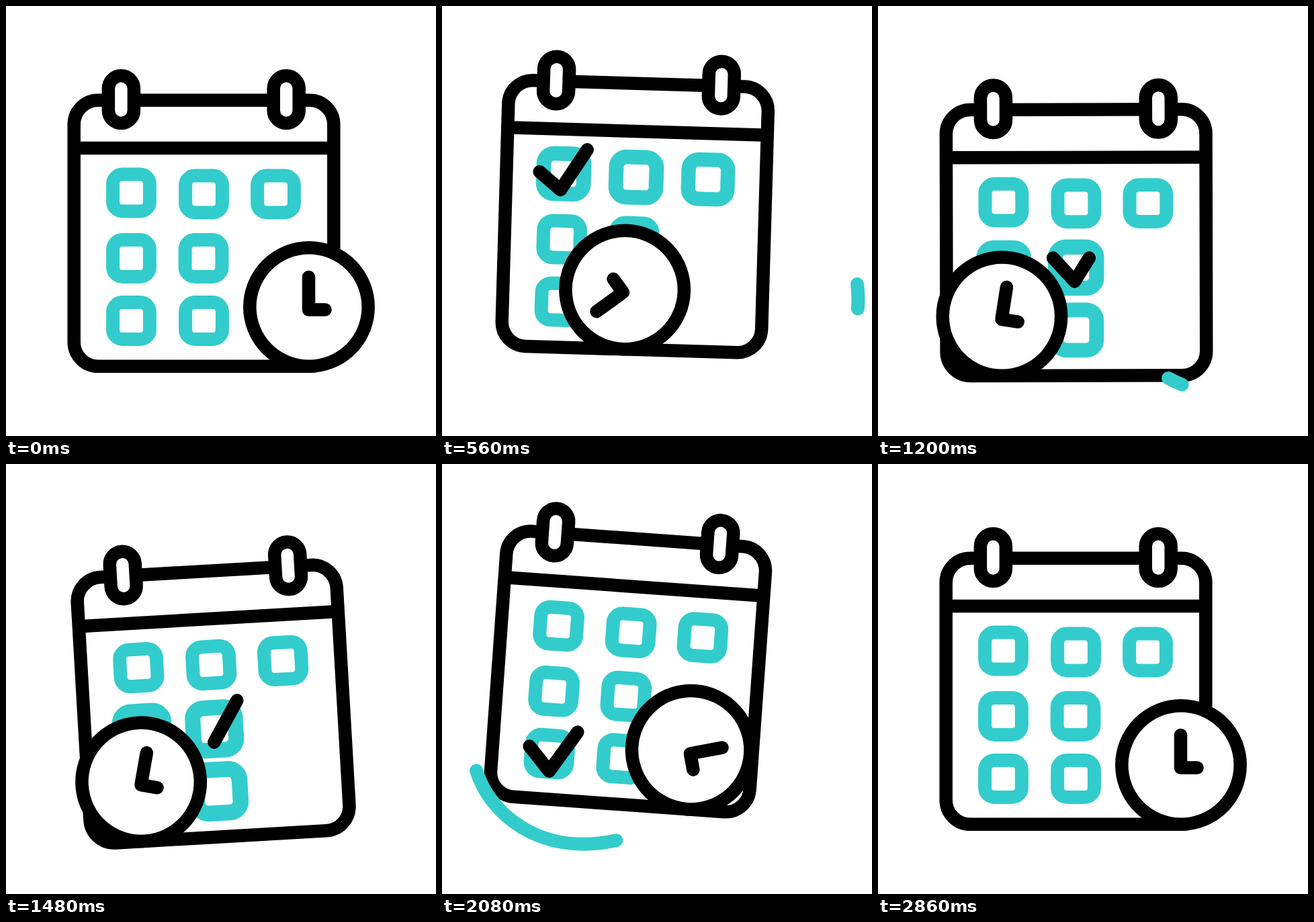
An HTML page that plays this animation: 640 by 640 pixels, repeating every 3.26 s.

```html
<!DOCTYPE html>
<html lang="en">
<head>
<meta charset="utf-8">
<title>Calendar and clock</title>
<style>
  html, body { margin: 0; width: 100%; height: 100%; overflow: hidden; background: #fff; }
  svg { display: block; width: 100vw; height: 100vh; }
  .ink { fill: none; stroke: #000; stroke-width: 19.5; stroke-linecap: round; stroke-linejoin: round; }
  .solid { fill: #fff; }
  .teal { fill: none; stroke: #3cc; stroke-width: 20; stroke-linecap: round; }
</style>
</head>
<body>
<svg viewBox="0 0 640 640">
  <g id="calendar">
    <rect class="ink" x="101.2" y="140.3" width="386.6" height="396" rx="36"/>
    <path class="ink" d="M102 211.5H487"/>
    <rect class="ink solid" x="152.4" y="103.8" width="38" height="70.6" rx="19"/>
    <rect class="ink solid" x="398.2" y="103.8" width="38" height="70.6" rx="19"/>
    <g id="days"></g>
    <g id="checks"></g>
    <g id="clock">
      <circle class="ink solid" cx="451" cy="448" r="88.2"/>
      <path id="hands" class="ink" d="M450.5 403.5V452H475"/>
    </g>
  </g>
  <g id="trails"></g>
</svg>
<script>
const LOOP = 3260;
const byId = id => document.getElementById(id);

function add(parent, tag, attrs) {
  const node = document.createElementNS('http://www.w3.org/2000/svg', tag);
  for (const key in attrs) node.setAttribute(key, attrs[key]);
  return byId(parent).appendChild(node);
}

const progress = (t, start, length) => Math.min(1, Math.max(0, (t - start) / length));
const ease = f => (1 - Math.cos(Math.PI * f)) / 2;
const easeOut = f => 1 - (1 - f) ** 2.8;

// Eased value between [time, value] keys
function track(keys, t) {
  let value = keys[0][1];
  for (let i = 1; i < keys.length; i++) {
    const [t0, v0] = keys[i - 1], [t1, v1] = keys[i];
    if (t >= t0) value = v0 + (v1 - v0) * ease(progress(t, t0, t1 - t0));
  }
  return value;
}

const lift = [[185, 0], [715, -31], [1380, 23], [1980, -31], [2560, 0]];
const tilt = [[390, 0], [780, 4.2], [1560, -3.5], [2120, 4.2], [2700, 0]];

// x, y, start of the swell
const days = [
  [186.5, 278, 435], [294.5, 280, 435], [401.5, 280, 455],
  [186.5, 375.5, 1075], [294, 375.5, 1055],
  [186.5, 468.5, 1075], [294.5, 468.5, 1075]
].map(([x, y, start]) => ({
  x, y, start,
  node: add('days', 'rect', { class: 'teal', x: -27.4, y: -27.4, width: 54.8, height: 54.8, rx: 14 })
}));

const stroke = (parent, cls, d, start, length, hold) => ({
  start, length, hold,
  node: add(parent, 'path', { class: cls, d, pathLength: 1 })
});
const check = (x, y, start, rise = 35) =>
  stroke('checks', 'ink', `M${x - 32} ${y - rise}L${x} ${y}l38 -61`, start, 180, 320);
const trail = (d, start, length, hold) => stroke('trails', 'teal', d, start, length, hold);

const strokes = [
  check(182.5, 302, 340, 26),
  check(292, 396, 1082),
  check(188, 494.5, 1860),
  trail('M618 414C632 530 540 612 432 554', 463, 430, 385),
  trail('M51 456C70 520 150 592 276 556', 1720, 430, 350),
  trail('M291 107V68', 2400, 180, 160)
];

// Grow from the start of the path, then let the tail catch up
function trim({ node, start, length, hold }, t) {
  const head = ease(progress(t, start, length));
  const tail = ease(progress(t, start + hold, length));
  node.style.visibility = head > tail ? 'visible' : 'hidden';
  node.setAttribute('stroke-dasharray', `${head - tail} 2`);
  node.setAttribute('stroke-dashoffset', -tail);
}

function draw() {
  const t = performance.now() % LOOP;
  byId('calendar').setAttribute('transform',
    `translate(0 ${track(lift, t)}) rotate(${track(tilt, t)} 294 94)`);

  const away = easeOut(progress(t, 180, 1300)) - easeOut(progress(t, 1480, 1380));
  byId('clock').setAttribute('transform', `translate(${-271 * away} 0)`);
  byId('hands').setAttribute('transform', `rotate(${374 * away} 449.4 452.4)`);

  for (const { node, x, y, start } of days) {
    const swell = 1 + 0.25 * Math.sin(Math.PI * progress(t, start, 600)) ** 2;
    node.setAttribute('transform', `translate(${x} ${y}) scale(${swell})`);
  }
  strokes.forEach(s => trim(s, t));
  requestAnimationFrame(draw);
}
draw();
</script>
</body>
</html>
```
